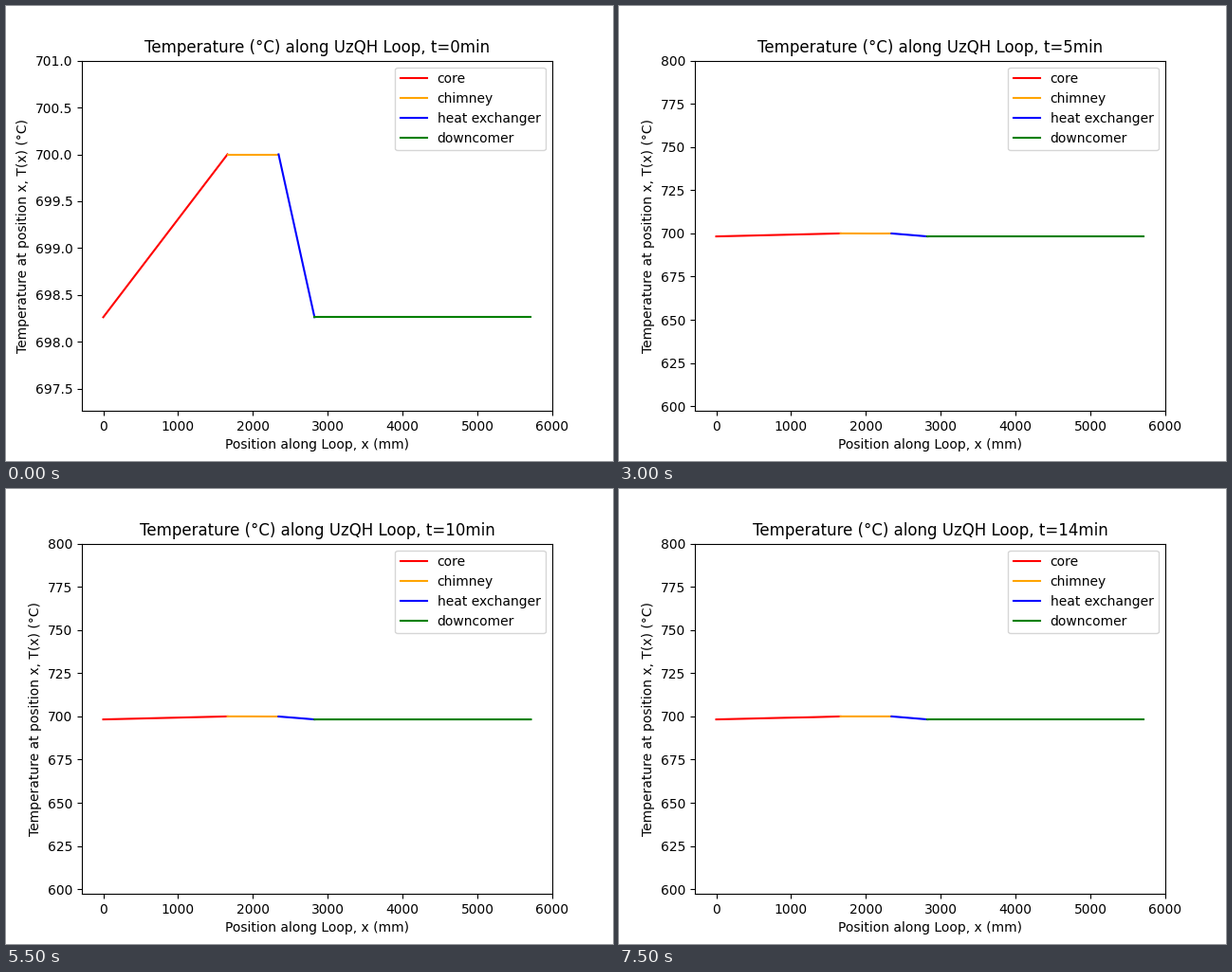
These frames come from a looping animation (640 by 480 pixels, 8000 ms). A matplotlib script:

```python
import numpy as np
import matplotlib.pyplot as plt
from matplotlib.animation import FuncAnimation

plt.rcParams["font.family"] = "DejaVu Sans"

FRAMES, INTERVAL = 16, 500
HOT, COLD = 700.0, 698.263
LOOP_LENGTH = 5715
SECTIONS = [
    # name, color, start x, end x, start temperature, end temperature
    ("core", "red", 0, 1660, COLD, HOT),
    ("chimney", "orange", 1660, 2343, HOT, HOT),
    ("heat exchanger", "blue", 2343, 2823, HOT, COLD),
    ("downcomer", "green", 2823, LOOP_LENGTH, COLD, COLD),
]


def ripple(x, minute):
    """Slight cool slug carried around the loop by the flow."""
    if minute == 0:
        return np.zeros_like(x)
    center = 3140 + 1175 * (minute - 1)
    half = LOOP_LENGTH / 2
    distance = (x - center + half) % LOOP_LENGTH - half
    return -0.06 * np.exp(-(distance / 250) ** 2)


fig, ax = plt.subplots(figsize=(6.4, 4.8), dpi=100)
fig.subplots_adjust(left=0.125, right=0.9, bottom=0.11, top=0.88)
margin = 0.05 * LOOP_LENGTH
ax.set_xlim(-margin, LOOP_LENGTH + margin)
ax.set_xlabel("Position along Loop, x (mm)")
ax.set_ylabel("Temperature at position x, T(x) (°C)")

lines = []
for name, color, x0, x1, t0, t1 in SECTIONS:
    x = np.linspace(x0, x1, 100)
    base = np.linspace(t0, t1, 100)
    line, = ax.plot(x, base, color=color, label=name)
    lines.append((line, x, base))
ax.legend(loc="upper right")


def update(frame):
    minute = max(0, frame - 1)
    ax.set_title(f"Temperature (°C) along UzQH Loop, t={minute}min")
    if minute == 0:
        ax.set_ylim(COLD - 1, HOT + 1)
    else:
        ax.set_ylim(COLD - 101, HOT + 100)
    for line, x, base in lines:
        line.set_ydata(base + ripple(x, minute))
    return [line for line, _, _ in lines]


anim = FuncAnimation(fig, update, frames=FRAMES, interval=INTERVAL,
                     init_func=lambda: update(0), repeat=True,
                     repeat_delay=0, blit=False)
plt.show()
```
